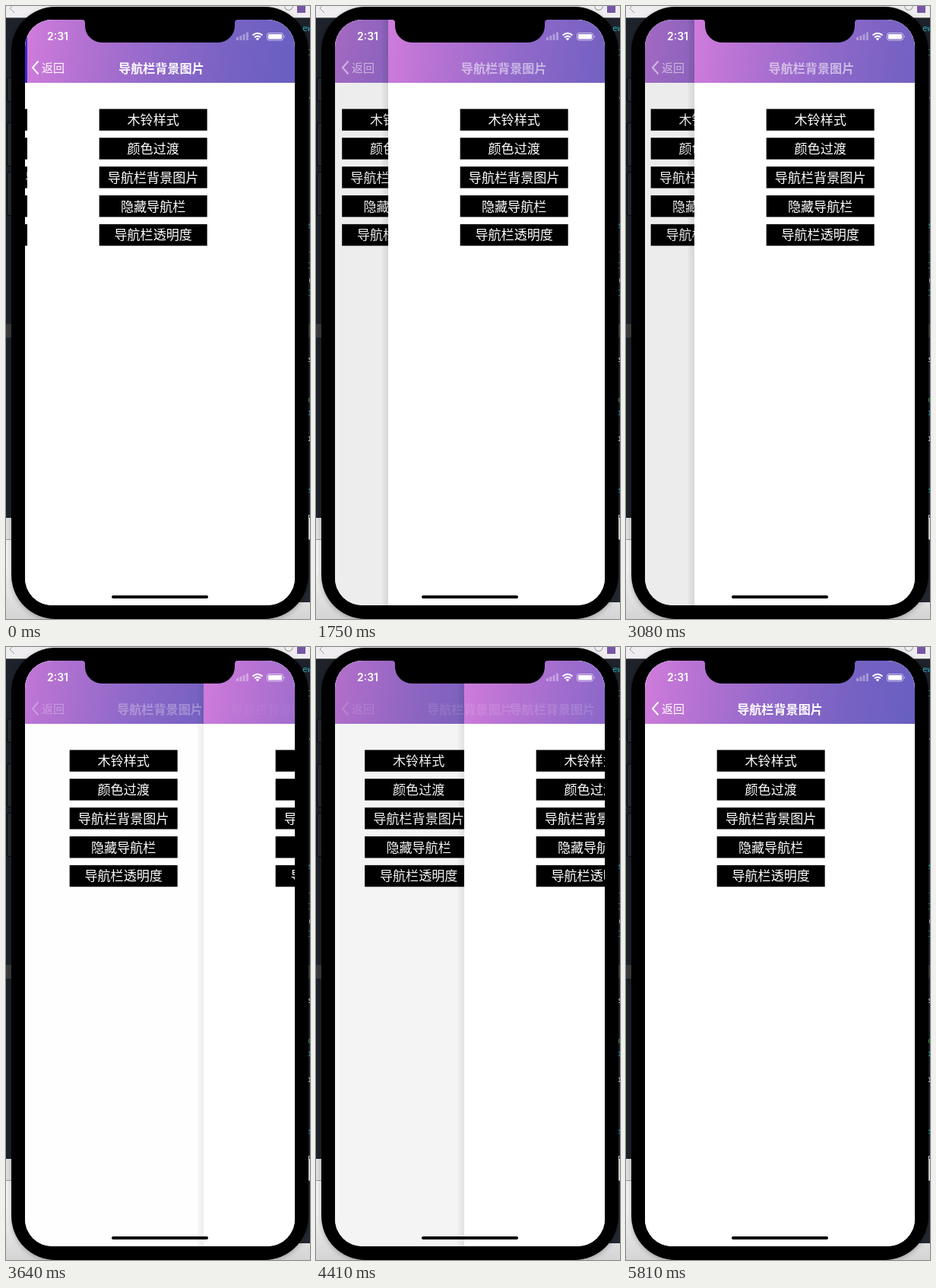
These frames come from a looping animation (400x806 px, 5.88 s). An HTML page:

```html
<!DOCTYPE html>
<html lang="zh-CN">
<head>
<meta charset="utf-8">
<title>Navigation bar transition</title>
<style>
html, body { margin: 0; width: 100%; height: 100%; overflow: hidden; }
body { position: relative; background: #1d222b; font-family: "Noto Sans CJK SC", "Noto Sans CJK", sans-serif; }
div, span, svg { position: absolute; }
.code { left: 398px; font: 11px/14px "Noto Sans Mono", monospace; }
.panel { left: 1px; width: 12px; box-sizing: border-box; background: #262a30; border: 1px solid #08090b; border-radius: 3px; }
#top { left: 0; top: 0; width: 400px; height: 15px; background: #efedf0; border-bottom: 1px solid #777; }
#tab { left: 383px; top: -2px; width: 11px; height: 11px; background: #7657a5; }
#ring { left: 366px; top: -8px; width: 12px; height: 14px; border: 1px solid #999; border-radius: 50%; box-sizing: border-box; }
#strip { left: 0; top: 418px; width: 400px; height: 18px; background: #3b3c3d; }
#dock { left: 0; top: 673px; width: 400px; height: 133px; background: linear-gradient(#dedede 0 28px, #999 28px 29px, #f1f1f1 29px 70px, #d4d4d4); }
#desk { left: 370px; top: 702px; width: 30px; height: 82px; background: #242931; }
#phone { left: 7px; top: 1px; width: 391px; height: 805px; border-radius: 58px; background: #000; box-shadow: 0 2px 6px rgba(0,0,0,.25); }
#screen { left: 25px; top: 18px; width: 355px; height: 770px; border-radius: 36px; overflow: hidden; background: #fff; }
.page { left: 0; top: 0; width: 355px; height: 770px; background: #fff; }
.page svg { left: 0; top: 0; }
.page text { font-size: 17.1px; fill: #fff; text-anchor: middle; }
.bar { left: 0; top: 0; width: 355px; height: 83px; background: linear-gradient(99deg, #d07cdc 0%, #b873d3 18%, #9169ca 48%, #7862c3 74%, #675fc2 100%); }
.blue .bar { background: #4326d0; }
#dim { left: 0; top: 0; width: 355px; height: 770px; background: #000; }
#shadow { left: -8px; top: 0; width: 8px; height: 770px; background: linear-gradient(90deg, rgba(0,0,0,.03), rgba(0,0,0,.1)); }
.title { left: 0; top: 51px; width: 355px; text-align: center; color: #fff; font-weight: 600; font-size: 16.1px; line-height: 24px; white-space: nowrap; }
.back { left: 0; top: 0; color: #fff; }
.back span { left: 22px; top: 51px; font-size: 15px; line-height: 24px; white-space: nowrap; }
.back svg { left: 8px; top: 52px; }
#clock { left: 54px; top: 31px; color: #fff; font: 600 14px/18px Inter, sans-serif; }
#home { left: 139px; top: 775px; width: 127px; height: 4px; border-radius: 2px; background: #000; }
#chrome { left: 0; top: 0; }
</style>
</head>
<body>
<div id="strip"></div>
<div class="panel" style="top:94px;height:32px"></div>
<div class="panel" style="top:153px;height:58px"></div>
<div class="panel" style="top:218px;height:58px"></div>
<div id="top"></div><div id="ring"></div><div id="tab"></div>
<div id="dock"></div><div id="desk"></div>
<div id="phone"></div>
<div id="screen">
  <div class="page" id="under"><div class="bar"></div></div>
  <div id="dim"></div>
  <div class="page" id="over"><div id="shadow"></div><div class="bar"></div></div>
  <div class="title" id="underTitle">导航栏背景图片</div>
  <div class="title" id="overTitle">导航栏背景图片</div>
  <div class="back" id="back">
    <svg width="12" height="22"><path d="M9.5 2.5 2 11l7.500 8.500" fill="none" stroke="#fff" stroke-width="2"/></svg>
    <span>返回</span>
  </div>
</div>
<svg id="chrome" width="400" height="60">
  <path d="M100 17v1a4 4 0 0 1 4 4v4a22 22 0 0 0 22 22h153a22 22 0 0 0 22-22v-4a4 4 0 0 1 4-4v-1z" fill="#000"/>
  <path d="M303 41h3v4h-3zM307.300 39h3v6h-3zM311.600 37h3v8h-3zM316 34.500h3v10.500h-3z" fill="#fff" opacity=".35"/>
  <g fill="none" stroke="#fff" stroke-width="2">
    <path d="M324.500 38.500q6.500-5.600 13 0M327 41.300q4-3.400 8 0"/>
  </g>
  <path d="M328.700 43q2.300-1.800 4.600 0l-2.300 2.500z" fill="#fff"/>
  <rect x="343.500" y="35.500" width="21" height="9.500" rx="2.500" fill="none" stroke="#fff" stroke-opacity=".6"/>
  <rect x="345" y="37" width="18" height="6.500" rx="1.300" fill="#fff"/>
  <path d="M366 38.500q2 1.700 0 3.500z" fill="#fff" opacity=".7"/>
  <path d="M11-3 5 3l6 6" fill="none" stroke="#999"/>
</svg>
<div id="clock">2:31</div>
<div id="home"></div>
<script>
const W = 355, LOOP = 5880, STEP = 70;
const PT = W / 375; // one layout point in pixels
const PUSH_START = 1540, PUSH_TIME = 630;
const labels = ['木铃样式', '颜色过渡', '导航栏背景图片', '隐藏导航栏', '导航栏透明度'];
// time and distance of the edge swipe
const drag = [[2600, 0], [3080, 65], [3640, 235], [3990, 262], [4410, 170], [5250, 0]];
const $ = id => document.getElementById(id);

// buttons of 150 by 30 points, 40 points apart
const buttons = labels.map((text, i) => {
  const y = (124 + 40 * i) * PT;
  return `<rect x="${100 * PT}" y="${y}" width="${150 * PT}" height="${30 * PT}"/>
    <text x="${175 * PT}" y="${y + 15 * PT + 6.4}">${text}</text>`;
}).join('');
for (const id of ['under', 'over'])
  $(id).insertAdjacentHTML('beforeend', `<svg width="${W}" height="320">${buttons}</svg>`);

const teal = '#2aa5b5', green = '#4f9a55', pale = '#d5d8dc';
[['ew', 29, teal, 390], ['l', 61, green], [';', 116, pale], ['s', 288, teal], ['-', 322, green],
 ['l', 341, green], ['(', 360, pale], ['l', 377, teal], ['s', 464, pale], ['c', 517, green],
 ['r', 534, teal], ['r', 568, pale], ['s', 636, teal], ['n', 671, pale]]
  .forEach(([text, y, color, x = 397]) => {
    const el = document.createElement('div');
    el.className = 'code';
    el.textContent = text;
    Object.assign(el.style, { top: y - 7 + 'px', left: x + 'px', color });
    document.body.append(el);
  });

function offsetAt(t) {
  if (t < 140) return 3 * (1 - t / 140);
  if (t >= PUSH_START && t < PUSH_START + PUSH_TIME)
    return W * (1 - (t - PUSH_START) / PUSH_TIME) ** 4;
  for (let i = 1; i < drag.length; i++) {
    const [t0, x0] = drag[i - 1], [t1, x1] = drag[i];
    if (t >= t0 && t < t1) return x0 + (x1 - x0) * (t - t0) / (t1 - t0);
  }
  return 0;
}

const slide = (id, x) => $(id).style.transform = `translateX(${x}px)`;
const fade = (id, a) => $(id).style.opacity = a;

function draw(t) {
  const x = offsetAt(t), p = x / W;
  const fadeIn = p ** 3, fadeOut = (1 - p) ** 3;
  const shade = Math.min(1, x / 30); // the shading appears as the pages part
  slide('over', Math.round(x));
  slide('under', -0.3 * (W - x));
  slide('overTitle', 0.637 * x);
  fade('overTitle', fadeOut);
  fade('underTitle', fadeIn);
  fade('back', Math.max(fadeIn, fadeOut));
  fade('dim', shade * Math.max(0, 0.076 * (1 - (p / 0.68) ** 2.5)));
  fade('shadow', shade * (1 - 0.5 * p));
  $('under').classList.toggle('blue', t < 1000);
}

const start = performance.now();
function tick() {
  const t = (performance.now() - start) % LOOP;
  draw(Math.floor(t / STEP) * STEP);
  requestAnimationFrame(tick);
}
tick();
</script>
</body>
</html>
```
